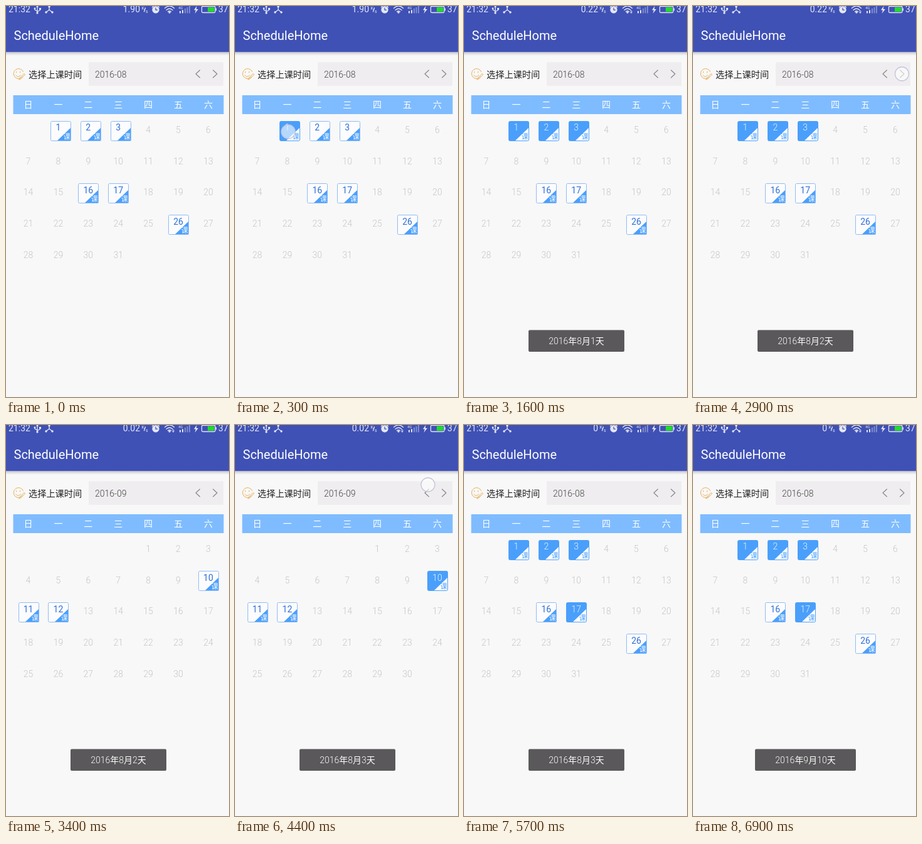
These frames come from a looping animation (356x622 px, 7100 ms). An HTML page:

```html
<!DOCTYPE html>
<html lang="zh-CN">
<head>
<meta charset="utf-8">
<style>
  html, body { margin: 0; width: 100%; height: 100%; overflow: hidden; background: #f8f8f8; }
  svg { display: block; width: 100vw; height: 100vh; }
  text { font-family: Roboto, "Noto Sans CJK SC", "Noto Sans CJK", sans-serif; font-size: 14px; white-space: pre; }
  .line { fill: none; stroke-linecap: round; stroke-linejoin: round; }
</style>
</head>
<body>
<svg id="stage" viewBox="0 0 356 622">
  <defs>
    <linearGradient id="shadow" x2="0" y2="1">
      <stop stop-color="#b0b2c4"/><stop offset=".4" stop-color="#dcdce0"/><stop offset="1" stop-color="#f8f8f8"/>
    </linearGradient>
  </defs>
  <rect width="356" height="622" fill="#f8f8f8"/>
  <rect y="73" width="356" height="6" fill="url(#shadow)"/>
  <rect width="356" height="73" fill="#3f51b5"/>
  <text x="12.5" y="53.5" fill="#fff" style="font-size:20px">ScheduleHome</text>

  <!-- status bar -->
  <g fill="#e4e6f5">
    <text x="4" y="10">21:32</text>
    <text x="339" y="10">37</text>
    <text x="216.5" y="6" style="font-size:7px">K</text>
    <text x="223" y="10.5" style="font-size:7px">s</text>
    <text x="275" y="4.5" style="font-size:6px">4G</text>
    <circle cx="50" cy="11" r="1.7"/>
    <path d="M48 2l2-3 2 3zM53 3h3v3h-3z"/><circle cx="46" cy="4" r="1.4"/>
    <circle cx="69" cy="1" r="1.7"/><circle cx="64" cy="10" r="1.7"/><circle cx="74" cy="10" r="1.7"/>
    <circle cx="239" cy="6" r="5.7"/>
    <circle cx="261" cy="10.3" r="1.5"/>
    <path d="M304.5 0l-4.5 6.5h3l-1.5 5.5 5.5-7h-3.2z"/>
    <path d="M277 8h2v3.5h-2zM281 6.5h2v5h-2z"/>
    <path d="M285 4h2v7.5h-2zM288.5 2h2v9.5h-2zM292 0h2v11.5h-2z" opacity=".4"/>
    <rect x="334.5" y="3.5" width="1.5" height="4"/>
  </g>
  <g class="line" stroke="#e4e6f5" stroke-width="1.3">
    <path d="M50 0v11M46 4v2l4 2.5M54.5 5v1.5L50 9M69 1v5l-5 4M69 6l5 4M222.500 3l-2 6"/>
    <path d="M253.500 3.500q7.500-7 15 0M256 6.500q5-4.500 10 0M258.500 9q2.500-2 5 0"/>
    <path d="M233.500 2l2.200-2M244.500 2l-2.200-2"/>
    <rect x="312.500" y="0.500" width="21.500" height="10" rx="1.500"/>
  </g>
  <path class="line" d="M239 3v3.300h2.500" stroke="#3f51b5" stroke-width="1.200"/>
  <rect x="322" y="2" width="10.500" height="7" fill="#20dc28"/>

  <!-- month picker -->
  <g class="line" stroke="#e8b05c">
    <path d="M27.500 104.500a8 8 0 1 0-1 8M15.500 110q4 5 8 0M22 114.500l7-7 1.500 1.500-7 7-2.500 1zM16.500 104.500v1.500M22.500 104.500v1.500"/>
  </g>
  <text x="36" y="113.500" fill="#222" style="font-size:14.200px">选择上课时间</text>
  <rect x="132" y="89.500" width="215" height="37.500" fill="#efedef"/>
  <path class="line" d="M309.500 102l-6.500 6 6.500 6M330.500 102l6.500 6-6.500 6" stroke="#858585" stroke-width="1.100"/>
  <rect x="11.500" y="142" width="336" height="30" fill="#7fbcff"/>
  <g id="live"></g>
</svg>
<script>
const LOOP = 7100, STEP = 100;
const BLUE = '#4a9ffb';
const AUGUST = { name: '2016-08', offset: 1, days: 31, marked: [1, 2, 3, 16, 17, 26], picked: { 1: 300, 2: 800, 3: 1500, 17: 5300 } };
const SEPTEMBER = { name: '2016-09', offset: 4, days: 30, marked: [10, 11, 12], picked: { 10: 3900 } };
const TOASTS = [
  { at: 300, text: '2016年8月1天', width: 153 },
  { at: 2100, text: '2016年8月2天', width: 153 },
  { at: 3800, text: '2016年8月3天', width: 153 },
  { at: 5700, text: '2016年9月10天', width: 161 }
];
// x, y, press time, release time
const TOUCHES = [
  [85, 200, 100, 400], [132.5, 199.5, 700, 900], [182, 199, 1300, 1600], [333.5, 108, 2900, 3100],
  [323, 237, 3700, 4000], [308, 95, 4400, 4700], [179, 300, 5100, 5400]
];
const live = document.getElementById('live');
const columnX = column => 35.5 + 47.9 * column;
const onPixel = value => Math.floor(value) + 0.5;

function label(x, y, content, fill, { size = 14, weight = 400, anchor = 'middle' } = {}) {
  return `<text x="${x}" y="${y}" fill="${fill}" text-anchor="${anchor}" style="font-size:${size}px;font-weight:${weight}">${content}</text>`;
}

function markedDay(day, x, y, selected) {
  const left = onPixel(x - (day > 9 ? 15.5 : 11.5)), top = onPixel(y - 18.6);
  const [face, corner, border, ink] = selected
    ? [BLUE, '#fff', BLUE, '#e6f2ff']
    : ['#fcfcfe', BLUE, '#8fbcf5', '#2f6fd6'];
  return `<g transform="translate(${left} ${top})">
    <rect width="32" height="31" rx="2" fill="${face}"/>
    <path d="M32 10v21H10z" fill="${corner}"/>
    <rect width="32" height="31" rx="2" fill="none" stroke="${border}"/>
    ${label(25.7, 28.8, '课', selected ? BLUE : '#fff', { size: 11 })}</g>` +
    label(x, y - 3.5, day, ink, { weight: selected ? 300 : 400 });
}

function calendar(month, t) {
  let out = label(142, 113.5, month.name, '#444', { anchor: 'start', weight: 300 });
  for (let day = 1; day <= month.days; day++) {
    const slot = day - 1 + month.offset;
    const x = columnX(slot % 7), y = 201.8 + 49.75 * Math.floor(slot / 7);
    out += month.marked.includes(day)
      ? markedDay(day, x, y, t >= month.picked[day])
      : label(x, y, day, '#c6c6c8', { weight: 300 });
  }
  return out;
}

function toast({ at, text, width }, t) {
  const u = Math.min(1, (t - at) / 400);
  return `<g opacity="${1 - (1 - u) ** 2}">
    <rect x="${179.5 - width / 2}" y="515.5" width="${width}" height="34.5" rx="2" fill="#5a585a"/>
    ${label(179.5, 538.3, text, '#fff', { weight: 300 })}</g>`;
}

function statusBar(t) {
  const speed = t < 400 ? '1.90' : t < 3400 ? '0.22' : t < 5200 ? '0.02' : '0';
  const busy = t >= 1500 && (t < 6000 || t >= 6900);
  return label(214, 10, speed, '#e4e6f5', { anchor: 'end' }) +
    (busy ? '<path d="M265 9.500h4l-2 2.500zM265 8.500h4l-2-1.500z" fill="#e4e6f5"/>' : '');
}

function touch([x, y]) {
  return `<circle cx="${x}" cy="${y}" r="11" fill="#fff" fill-opacity=".6" stroke="#c6c5da" stroke-width="1.3"/>`;
}

function draw(t) {
  const month = t >= 3000 && t < 4600 ? SEPTEMBER : AUGUST;
  const weekdays = [...'日一二三四五六'].map((name, i) => label(columnX(i), 162, name, '#fff')).join('');
  // A new toast fades in over the one before it.
  const toasts = TOASTS.filter(({ at }) => t >= at).slice(-2)
    .filter((item, i, list) => i === list.length - 1 || t < list[1].at + 400);
  live.innerHTML = statusBar(t) + weekdays + calendar(month, t) +
    toasts.map(item => toast(item, t)).join('') +
    TOUCHES.filter(([, , from, to]) => t >= from && t < to).map(touch).join('');
}

const start = performance.now();
let shown = -1;
function tick() {
  const elapsed = (performance.now() - start) % LOOP;
  const t = Math.floor(elapsed / STEP) * STEP;
  if (t !== shown) draw(shown = t);
  requestAnimationFrame(tick);
}
tick();
</script>
</body>
</html>
```
